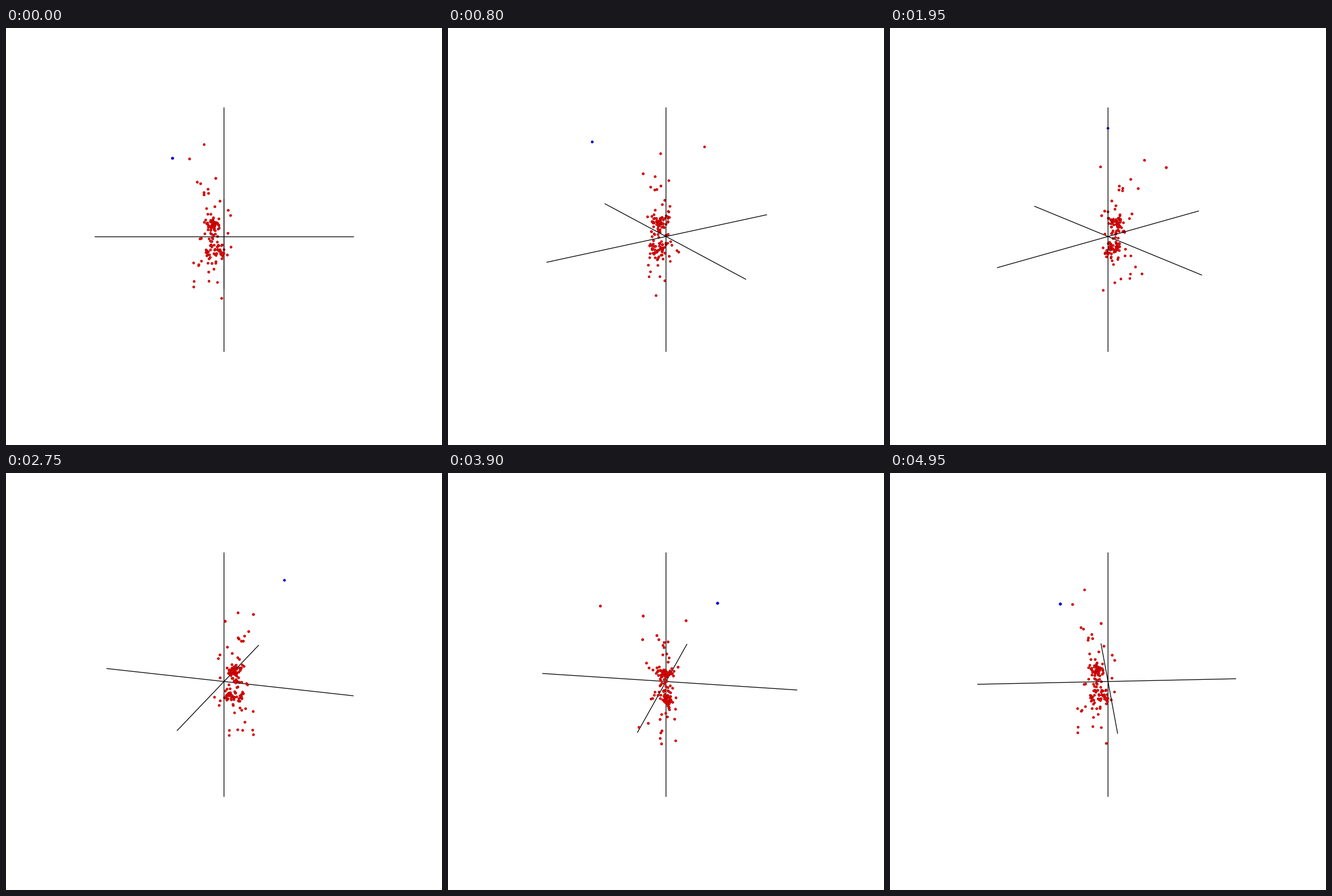
Write a matplotlib script that moves like this. It is 765 px wide and 732 px high and loops after 5000 ms.

```python
import numpy as np
import matplotlib.pyplot as plt
from matplotlib.animation import FuncAnimation

W, H, DPI = 765, 732, 100
FRAMES, INTERVAL = 100, 50
CX, CY = 382.5, 366
AXIS = 227.5                  # half length of each axis, px
DIST = 6 * AXIS               # camera distance
ELEV = np.radians(19.9)
DOT = 4.1                     # dot diameter, px
RED, RED_EDGE = (0.93, 0, 0), (0.62, 0, 0)
BLUE, BLUE_EDGE = (0, 0, 0.93), (0, 0, 0.62)

# Scattered points around the core: x (right), y (towards viewer), z (up)
OUTER = np.array([
    (-36, -105, 140), (-59.5, -26.5, 133), (-13.7, 37, 116), (-46, -6.5, 97),
    (-41, -32, 87), (-27.5, -7, 84.3), (-34, 10, 83.3), (-26.5, 2, 79.5),
    (-34.3, 1.5, 76.7), (-6.9, -2, 64.3), (-15.8, -2.5, 54),
    (-30.8, -28, 42.4), (7.4, 0, 48.3), (11.4, 3.5, 40), (-28.6, -24, 33.2),
    (-22.6, 8, 43.7), (-31.7, 5, 32.2), (-34, 8, 29), (-20.5, 25, 35),
    (7, 0, 6), (-42, 4, -3), (-39.5, 6, -1.5), (12.6, -15, -25.6),
    (0, -27, -35), (6, -3, -36), (-54, 0, -50), (-40, 0, -46.5),
    (-46.5, -39, -71), (-45.5, -22.5, -62.5), (-28.3, 5, -48.5),
    (-21, 21, -42.5), (-14.2, 8, -44.5), (-14.5, 9, -47), (-17.8, 6, -59.5),
    (-26.8, 20.5, -59), (-53.5, 0, -85.7), (-54.3, 2.5, -95.5),
    (-27, -4, -87), (-11.7, -5, -89.8), (-4.1, 18.5, -110.5),
])
MARKED = (-80.5, 97.5, 165.5)

# Core clusters: count, centre, spread
CLUSTERS = [
    (44, (-17, -1, 21), (14, 20, 13)),
    (12, (-20, 2, -4), (20, 17, 13)),
    (22, (-13, -3, -21), (15, 20, 11)),
    (12, (-27, 13, -30), (9, 10, 13)),
    (10, (-8, 4, -33), (15, 16, 8)),
]


def make_points():
    rng = np.random.default_rng(7)
    core = [np.array(c) + np.array(s) * rng.triangular(-1, 0, 1, (n, 3))
            for n, c, s in CLUSTERS]
    return np.vstack([MARKED, OUTER, *core])


def project(pts, angle):
    """Turn about the vertical axis; return screen x, y, scale and nearness."""
    x, y, z = np.asarray(pts, float).T
    c, s = np.cos(angle), np.sin(angle)
    side, near = x * c - y * s, x * s + y * c
    depth = near * np.cos(ELEV) + z * np.sin(ELEV)
    rise = z * np.cos(ELEV) - near * np.sin(ELEV)
    scale = 1 / (1 - depth / DIST)
    return CX + side * scale, CY - rise * scale, scale, near


points = make_points()
faces = np.array([BLUE] + [RED] * (len(points) - 1))
edges = np.array([BLUE_EDGE] + [RED_EDGE] * (len(points) - 1))
axis_ends = [np.outer((-AXIS, AXIS), unit) for unit in np.eye(3)]

fig = plt.figure(figsize=(W / DPI, H / DPI), dpi=DPI, facecolor="white")
ax = fig.add_axes([0, 0, 1, 1])
ax.set(xlim=(0, W), ylim=(H, 0))
ax.axis("off")

px = 72 / DPI
lines = [ax.plot([], [], color="black", lw=1.3 * px, zorder=2,
                 solid_capstyle="butt")[0] for _ in axis_ends]
behind, front = (ax.scatter([], [], linewidths=0.6 * px, zorder=z)
                 for z in (1, 3))


def fill(dots, idx, xy, scale):
    dots.set_offsets(xy[idx])
    dots.set_sizes((DOT * px * scale[idx]) ** 2)
    dots.set_facecolors(faces[idx])
    dots.set_edgecolors(edges[idx])


def draw(frame):
    angle = 2 * np.pi * frame / FRAMES
    for line, ends in zip(lines, axis_ends):
        line.set_data(*project(ends, angle)[:2])
    x, y, scale, near = project(points, angle)
    xy = np.column_stack([x, y])
    order = np.argsort(scale)
    fill(behind, order[near[order] < 0], xy, scale)
    fill(front, order[near[order] >= 0], xy, scale)
    return [*lines, behind, front]


anim = FuncAnimation(fig, draw, frames=FRAMES, interval=INTERVAL,
                     repeat=True, repeat_delay=0)
plt.show()
```
